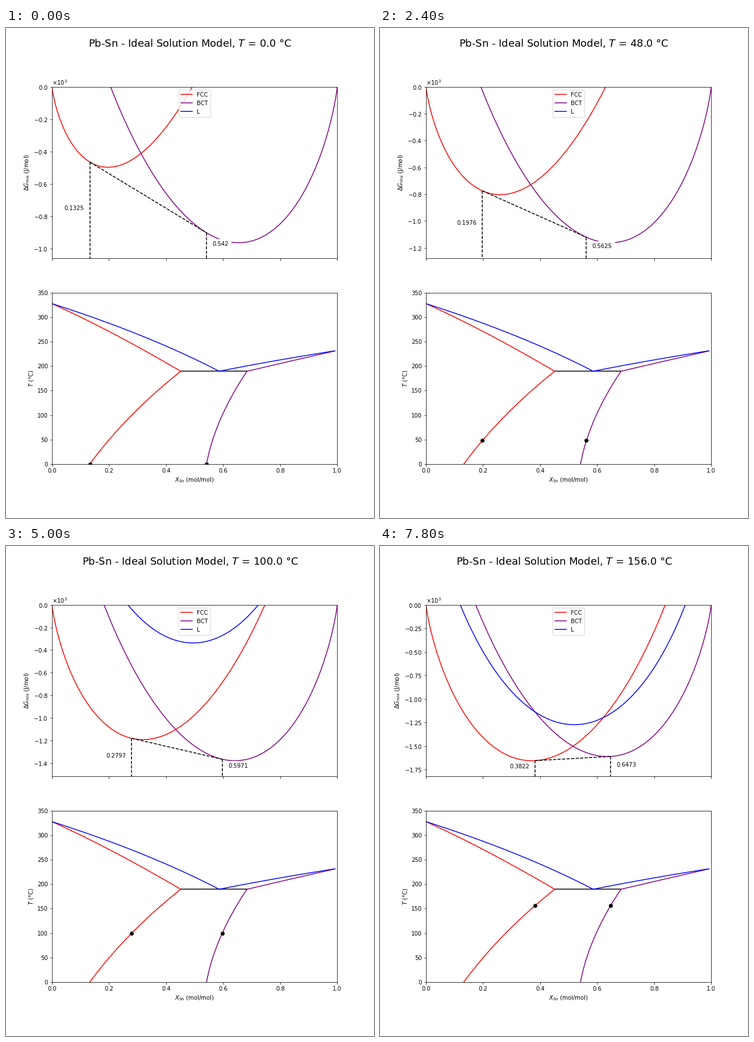
Animation of 648x864 px, one loop 8 s. Source, as a matplotlib script:

```python
import numpy as np
import matplotlib.pyplot as plt
from matplotlib.animation import FuncAnimation

R = 8.3145
K0 = 273.15
COLORS = {"FCC": "red", "BCT": "purple", "L": "blue"}


def pure(phase, T):
    """Gibbs energies of pure Pb and Sn relative to fcc Pb and bct Sn."""
    if phase == "FCC":
        return 0.0 * T, 5510 - 8.46 * T
    if phase == "BCT":
        return 489 + 3.52 * T, 0.0 * T
    pb = 4672.124 - 7.750683 * T - 6.019e-19 * T**7
    sn = np.where(T < 505.08,
                  7103.092 - 14.087767 * T + 1.47031e-18 * T**7,
                  6971.586 - 13.814383 * T + 1.2307e25 * T**-9.0)
    return pb, sn


def g_mix(phase, x, T):
    pb, sn = pure(phase, T)
    return (1 - x) * pb + x * sn + R * T * (x * np.log(x) + (1 - x) * np.log(1 - x))


def tie_line(p1, p2, T):
    """Sn contents of two ideal phases in equilibrium."""
    pb1, sn1 = pure(p1, T)
    pb2, sn2 = pure(p2, T)
    s = np.exp((sn1 - sn2) / (R * T))
    p = np.exp((pb1 - pb2) / (R * T))
    x1 = (1 - p) / (s - p)
    return x1, s * x1


def eutectic():
    lo, hi = K0 + 150, K0 + 220
    for _ in range(50):
        mid = (lo + hi) / 2
        if tie_line("FCC", "BCT", mid)[0] < tie_line("FCC", "L", mid)[0]:
            lo = mid
        else:
            hi = mid
    return mid


x = np.linspace(1e-9, 1 - 1e-9, 1001)
fig, (top, low) = plt.subplots(2, 1, sharex=True, figsize=(9, 12), dpi=72)
title = fig.suptitle("", fontsize=18)

# free energy curves
curves = {p: top.plot([], [], color=c, label=p)[0] for p, c in COLORS.items()}
tangent, left, right = (top.plot([], [], "k--")[0] for _ in range(3))
box = dict(facecolor="white", edgecolor="white")
tag_l = top.text(0, 0, "", ha="right", bbox=box)
tag_r = top.text(0, 0, "", ha="left", bbox=box)
top.set_xlim(0, 1)
top.set_ylabel(r"$\Delta G_{\mathrm{mix}}$ (J/mol)")
top.ticklabel_format(axis="y", style="sci", scilimits=(0, 0), useMathText=True)
top.legend(loc="upper center")

# phase diagram
Te = eutectic()
xa, xb = tie_line("FCC", "BCT", Te)
low.plot([xa, xb], [Te - K0] * 2, "k")
for p1, p2, t0, t1 in (("FCC", "BCT", K0, Te),
                       ("FCC", "L", Te, K0 + 327.4),
                       ("BCT", "L", Te, K0 + 231)):
    T = np.linspace(t0, t1, 200)
    for phase, xs in zip((p1, p2), tie_line(p1, p2, T)):
        low.plot(xs, T - K0, color=COLORS[phase])
dots, = low.plot([], [], "ko")
low.set_ylim(0, 350)
low.set_xlabel(r"$X_{\mathrm{Sn}}$ (mol/mol)")
low.set_ylabel("$T$ (°C)")


def update(i):
    t = 4.0 * i
    T = t + K0
    title.set_text(f"Pb-Sn - Ideal Solution Model, $T$ = {t:.1f} °C")
    floor = 0
    for phase, line in curves.items():
        g = g_mix(phase, x, T)
        line.set_data(x, g)
        floor = min(floor, 1.1 * g.min())
    top.set_ylim(floor, 0)

    x1, x2 = tie_line("FCC", "BCT", T)
    g1, g2 = g_mix("FCC", x1, T), g_mix("BCT", x2, T)
    tangent.set_data([x1, x2], [g1, g2])
    for drop, tag, xi, gi, dx in ((left, tag_l, x1, g1, -0.02),
                                  (right, tag_r, x2, g2, 0.02)):
        drop.set_data([xi, xi], [gi, floor])
        tag.set_position((xi + dx, (gi + floor) / 2))
        tag.set_text(str(round(float(xi), 4)))
    dots.set_data([x1, x2], [t, t])
    return ()


anim = FuncAnimation(fig, update, frames=40, interval=200, repeat=True,
                     repeat_delay=0, init_func=lambda: update(0))
plt.show()
```
